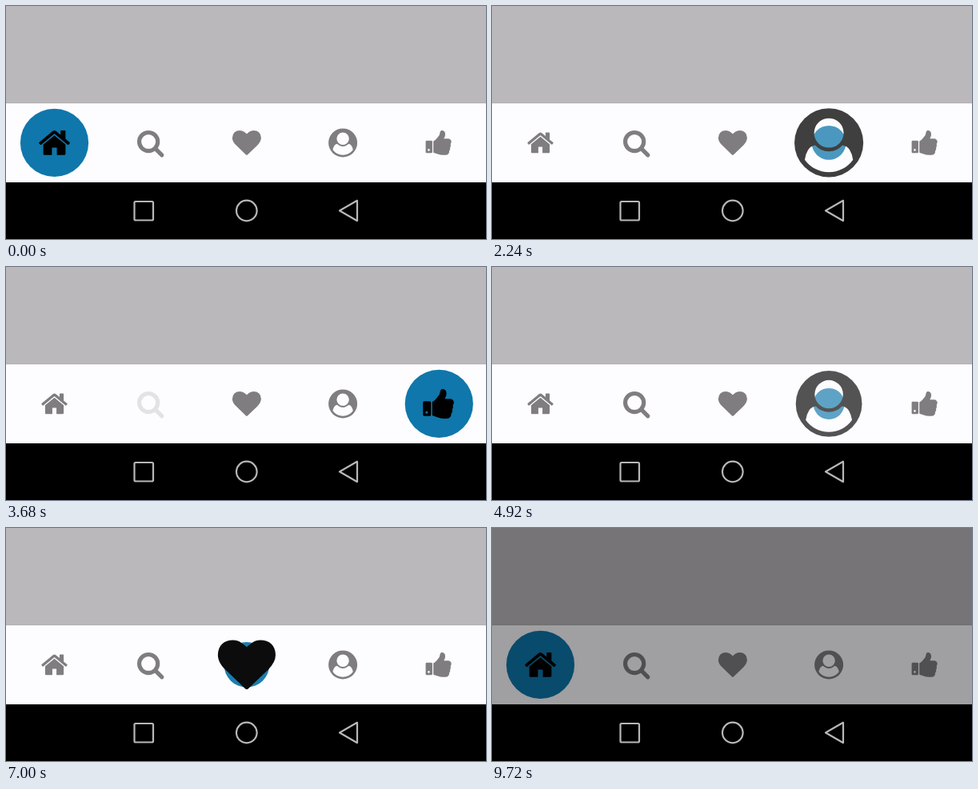
An HTML page that plays this animation: 600x292 px, repeating every 9920 ms.

```html
<!DOCTYPE html>
<html lang="en">
<head>
<meta charset="utf-8">
<title>Tab bar</title>
<style>
  html, body { margin: 0; width: 100%; height: 100%; overflow: hidden; background: #000; }
  svg { display: block; width: 600px; height: 292px; }
  .tab { color: #7f7d80; }
  .tab.on { color: #000; }
  .icon { fill: currentColor; fill-rule: evenodd; }
  .disc { fill: #0f77ab; }
  .lens { fill: none; stroke: currentColor; stroke-width: 256; stroke-linecap: round; }
  .keys { fill: none; stroke: #b9b7b9; stroke-width: 2.2; stroke-linejoin: round; }
</style>
</head>
<body>
<svg viewBox="0 0 600 292">
  <rect width="600" height="122" fill="#bab8ba"/>
  <rect y="121" width="600" height="1" fill="#b3b1b3"/>
  <rect y="122" width="600" height="99" fill="#fdfcfe"/>

  <g class="tab"><path d="M1472 992v480q0 64-64 64h-384v-384h-256v384h-384q-64 0-64-64v-480l1-6 575-474 575 474zm223-69l-62 74q-8 9-21 11-14 1-24-7l-692-577-692 577q-12 8-24 7-13-2-21-11l-62-74q-16-25 4-45l719-599q32-26 76-26t76 26l244 204v-195q0-32 32-32h192q32 0 32 32v408l219 182q20 20 4 45z"/></g>

  <g class="tab"><g class="lens"><circle cx="768" cy="832" r="576"/><path d="M1190 1254L1600 1664"/></g></g>

  <g class="tab"><path d="M896 1664q-26 0-44-18l-624-602q-10-8-27.5-26t-55.5-65.5-68-97.5-53.5-121-23.5-138q0-220 127-344t351-124q62 0 126.5 21.5t120 58 95.5 68.5 76 68q36-36 76-68t95.5-68.5 120-58 126.5-21.5q224 0 351 124t127 344q0 221-229 450l-623 600q-18 18-44 18z"/></g>

  <g class="tab"><path d="M0 896a896 896 0 1 1 1792 0a896 896 0 1 1-1792 0zM512 640a384 384 0 1 0 768 0a384 384 0 1 0-768 0zM1523 1339q-22-155-87.5-257.5t-184.5-118.5q-67 74-159.5 115.5t-195.5 41.5-195.5-41.5-159.5-115.5q-119 16-184.5 118.5t-87.5 257.5q106 150 271 237.5t356 87.5 356-87.5 271-237.5z"/></g>

  <g class="tab"><path d="M128 768h288q64 0 64 64v640q0 64-64 64h-288q-64 0-64-64v-640q0-64 64-64zM192 1344a64 64 0 1 0 128 0a64 64 0 1 0-128 0zM1664 832q0 86-55 149 15 44 15 76 3 76-43 137 17 56 0 117-15 57-54 94 9 112-49 181-64 76-197 78h-129q-150 0-386-84-123-43-158-44-64-3-64-64v-641q0-60 61-64 24-2 76-59t101-121q68-87 101-120 30-35 62-157 25-182 111-182c150 0 224 70 224 256q0 104-56 192-20 35-29 64h277q78 0 135 57t57 135z"/></g>

  <rect id="dim" width="600" height="221" opacity="0"/>
  <rect y="221" width="600" height="71"/>
  <g class="keys">
    <rect x="160.5" y="245" width="23.5" height="23.5" rx="1.5"/>
    <circle cx="300.8" cy="256.5" r="12.8"/>
    <path d="M417 256.5L439 243.8V269.2Z"/>
  </g>
</svg>
<script>
const LOOP = 9920, BOUNCE = 500, FADE_DELAY = 100, FADE = 250, PRESSED = 0.2;
const UNIT = 18 / 896;

// [tab, finger down, finger up]
const taps = [
  [1, 40, 140], [2, 1000, 1220], [3, 1960, 1990], [4, 2800, 2890], [1, 3680, 3760],
  [3, 4560, 4685], [0, 5680, 5780], [2, 6520, 6695], [4, 7520, 7580], [0, 8320, 8420]
];
const dims = [[9520, 0.12], [9600, 0.25], [9720, 0.37]];

const clamp = x => Math.min(1, Math.max(0, x));
const smooth = x => x * x * (3 - 2 * x);
const quad = x => x < 0.5 ? 2 * x * x : 1 - 2 * (1 - x) * (1 - x);

function make(name, className) {
  const node = document.createElementNS("http://www.w3.org/2000/svg", name);
  node.setAttribute("class", className);
  return node;
}

const tabs = [...document.querySelectorAll(".tab")].map((group, i) => {
  const icon = make("g", "icon"), disc = make("circle", "disc");
  icon.append(...group.children);
  group.append(disc, icon);
  group.setAttribute("transform", `translate(${60.5 + 120.2 * i} 171.4)`);
  return { group, icon, disc };
});
const dim = document.getElementById("dim");

function draw(t) {
  let active = 0, since = BOUNCE;
  const opacity = [1, 1, 1, 1, 1];
  for (const [tab, down, up] of taps) {
    if (t < down) break;
    opacity[tab] = PRESSED + (1 - PRESSED) * quad(clamp((t - up - FADE_DELAY) / FADE));
    if (t >= up) {
      active = tab;
      since = t - up;
    }
  }
  const p = smooth(clamp(since / BOUNCE));
  tabs.forEach(({ group, icon, disc }, i) => {
    const on = i === active;
    const scale = on ? 2.4 - 1.2 * Math.abs(2 * p - 1) : 1;
    group.classList.toggle("on", on);
    group.setAttribute("opacity", opacity[i]);
    disc.setAttribute("r", on ? 42.6 * p : 0);
    icon.setAttribute("transform", `scale(${scale * UNIT}) translate(-896 -896)`);
  });
  dim.setAttribute("opacity", dims.reduce((a, [at, value]) => t >= at ? value : a, 0));
}

const start = performance.now();
function tick() {
  draw((performance.now() - start) % LOOP);
  requestAnimationFrame(tick);
}
tick();
</script>
</body>
</html>
```
